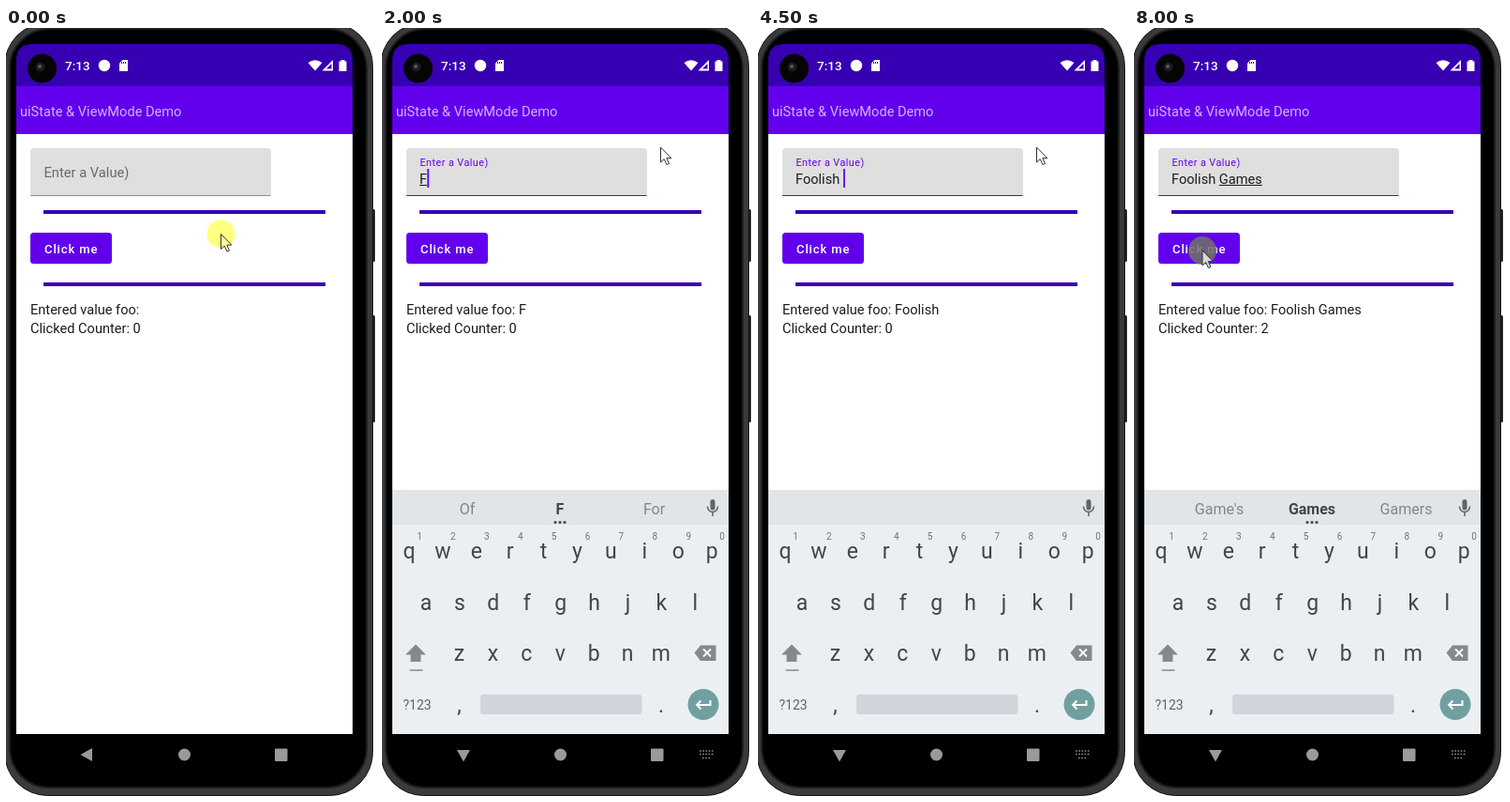
These frames come from a looping animation (395 by 818 pixels, 8500 ms). An HTML page:

```html
<!DOCTYPE html>
<html lang="en">
<head>
<meta charset="utf-8">
<title>uiState demo</title>
<style>
html, body { margin: 0; width: 100%; height: 100%; overflow: hidden; background: #fff; }
svg { display: block; width: 395px; height: 818px; font-family: Roboto, sans-serif; }
text { white-space: pre; }
.body { font-size: 14.6px; fill: #1c1c1c; }
.key { font-size: 23px; fill: #41464a; text-anchor: middle; }
.digit { font-size: 10px; fill: #6d7276; text-anchor: middle; }
.hint { font-size: 16px; fill: #80868b; text-anchor: middle; }
.mid { font-weight: 700; fill: #41464a; }
</style>
</head>
<body>
<svg viewBox="0 0 395 818" xmlns="http://www.w3.org/2000/svg">
  <rect width="395" height="818" fill="#fff"/>

  <!-- phone body -->
  <g fill="#222">
    <rect x="389" y="193" width="5" height="56" rx="1.5"/>
    <rect x="389" y="306" width="5" height="114" rx="1.5"/>
  </g>
  <rect x="-1.5" y="-5.500" width="393" height="823" rx="46" fill="#3a3a3a" stroke="#151515"/>
  <rect x="4" y="1" width="381" height="808" rx="42" fill="#000" stroke="#1c1c1c" stroke-width="2"/>
  <path d="M11 62V35Q11 17 29 17H352Q370 17 370 35V62Z" fill="#3700b3"/>
  <rect x="11" y="62" width="359" height="51" fill="#6200ee"/>
  <rect x="11" y="113" width="359" height="639" fill="#fff"/>

  <!-- status bar -->
  <circle cx="38.5" cy="43" r="15.5" fill="#050505"/>
  <circle cx="36.5" cy="41.5" r="5" fill="#1c1c20"/>
  <circle cx="36" cy="41" r="2" fill="#55555c"/>
  <g fill="#fff">
    <text x="63" y="45" font-size="13.5" font-weight="500">7:13</text>
    <circle cx="105" cy="40" r="6.2"/>
    <path d="M124.500 34H130V46H121V37.500Z"/>
    <path d="M322.500 37Q330 31.500 337.500 37L330 45.500Z"/>
    <path d="M349 34V45.500H337.500Z"/>
    <path d="M357.500 35.500V34H361.500V35.500H363.500V46H355.500V35.500Z"/>
  </g>
  <path d="M123.500 36V38M125.500 36V38M127.500 36V38" stroke="#3700b3"/>
  <path d="M347.500 38V43.500H342Z" fill="#3700b3"/>
  <text x="15" y="94" font-size="14.6" fill="#d0b3fa">uiState &amp; ViewMode Demo</text>

  <!-- form -->
  <path d="M26 179V132Q26 128 30 128H279Q283 128 283 132V179Z" fill="#dfdfdf"/>
  <rect id="line" x="26" y="178" width="256.500" height="1"/>
  <text id="label" x="40.500">Enter a Value)</text>
  <text id="value" class="body" x="40" y="165.500"></text>
  <rect id="under" y="167" height="1" fill="#1c1c1c"/>
  <rect id="caret" y="150" width="1.800" height="20" fill="#6200ee"/>
  <path d="M40 196H341M40 273H341" stroke="#3700b3" stroke-width="4"/>
  <rect x="26" y="219" width="87" height="33" rx="3.500" fill="#000" opacity=".14"/>
  <rect x="26" y="218" width="87" height="33" rx="3.500" fill="#6200ee"/>
  <text x="41" y="240" font-size="13" font-weight="500" letter-spacing=".9" fill="#fff">Click me</text>
  <text id="entered" class="body" x="26" y="305"></text>
  <text id="count" class="body" x="26" y="325"></text>

  <!-- keyboard -->
  <g id="board">
    <rect x="11" y="492" width="359" height="260" fill="#eceff1"/>
    <rect x="11" y="492" width="359" height="37" fill="#e1e5e8"/>
    <g id="hints">
      <text class="hint" x="91" y="518"></text>
      <text class="hint mid" x="190" y="518"></text>
      <text class="hint" x="290.500" y="518"></text>
      <path d="M185 526.500h.01M190 526.500h.01M195 526.500h.01" stroke="#41464a" stroke-width="3.200" stroke-linecap="round"/>
    </g>
    <rect x="350.500" y="502" width="5" height="11.500" rx="2.500" fill="#5f6468"/>
    <path d="M347.500 509.500a5.500 6 0 0 0 11 0M353 515.500V520" fill="none" stroke="#5f6468" stroke-width="1.600"/>
    <g id="keys"></g>
    <g id="mods">
      <path d="M36 656.500L47 667.500H41.500V675H30.500V667.500H25Z"/>
      <path d="M29.500 684H43.500" stroke="currentColor" stroke-width="1.500"/>
      <path d="M333.500 665.500L340 657.500H356.500V674H340Z"/>
    </g>
    <path d="M343 661.500l8 8m0 -8l-8 8" stroke="#fff" stroke-width="1.800"/>
    <text x="22.500" y="726" font-size="14" fill="#5f6468">?123</text>
    <rect x="105" y="710" width="172.500" height="21" rx="3" fill="#d2d4db"/>
    <circle cx="343" cy="720.500" r="16.500" fill="#6fa09f"/>
    <path d="M350.500 716V721H336M340.500 716.500L336 721L340.500 725.500" fill="none" stroke="#fff" stroke-width="1.900"/>
    <path d="M339 770H354M339 773.500H354M342 777.500H351" stroke="#8a8a8a" stroke-width="1.700" stroke-dasharray="1.700 1.500"/>
  </g>

  <!-- navigation -->
  <g fill="#9a9a9a">
    <path id="back" d="M79.500 774L92 767V781Z"/>
    <circle cx="190.500" cy="774" r="6.500"/>
    <rect x="287" y="767.500" width="13.500" height="13.500" rx="1"/>
  </g>

  <!-- pointer -->
  <g id="mouse">
    <circle id="halo" r="15"/>
    <path id="arrow" d="M0 0V16L3.700 12.600L6.500 18.600L9 17.500L6.300 11.600H11.300Z" stroke="#333" stroke-width="1"/>
  </g>
</svg>
<script>
const $ = id => document.getElementById(id);
const NS = 'http://www.w3.org/2000/svg';
const STEP = 500, LOOP = 8500;

function addKey(cls, x, y, char) {
  const t = document.createElementNS(NS, 'text');
  t.setAttribute('class', cls);
  t.setAttribute('x', x);
  t.setAttribute('y', y);
  t.textContent = char;
  $('keys').append(t);
}
const addRow = (cls, chars, x, y) =>
  [...chars].forEach((c, i) => addKey(cls, x + i * 35.9, y, c));
addRow('key', 'qwertyuiop', 29, 564.5);
addRow('digit', '1234567890', 40, 544.5);
addRow('key', 'asdfghjkl', 47, 619.5);
addRow('key', 'zxcvbnm', 82.5, 674);
addKey('key', 82.5, 729, ',');
addKey('key', 298, 729, '.');

// Each entry holds from its time until a later one replaces the same property.
const script = [
  [0, { text: '', hints: '', focus: false, caret: false, turn: 0, count: 0, x: 229.5, y: 219.5, halo: '#ffff80' }],
  [500, { x: 190, y: 157 }],
  [1000, { focus: true, caret: true, turn: -27, x: 297.5, y: 127, halo: '' }],
  [1500, { turn: -90 }],
  [2000, { text: 'F', hints: 'Of,F,For' }],
  [2500, { text: 'Foo', hints: 'Food,Foo,Foot' }],
  [3000, { text: 'Fooli', hints: 'Foolish,Fooli,Fooling' }],
  [3500, { text: 'Foolish', hints: 'Foolishly,Foolish,Foolishness' }],
  [4000, { text: 'Foolish ' }],
  [4500, { hints: '' }],
  [5500, { text: 'Foolish G' }],
  [6000, { text: 'Foolish Game', hints: "Game's,Game,Games" }],
  [6500, { text: 'Foolish Games', hints: "Game's,Games,Gamers", x: 198, y: 220 }],
  [7000, { x: 73, y: 237, halo: '#70706a' }],
  [7500, { count: 1 }],
  [8000, { count: 2, caret: false }]
];

function set(id, attrs) {
  for (const k in attrs) $(id).setAttribute(k, attrs[k]);
}
const show = (id, on) => set(id, { visibility: on ? 'visible' : 'hidden' });

function draw(time) {
  const s = {};
  for (const [at, change] of script) if (at <= time) Object.assign(s, change);
  const pressed = time >= 7000;

  set('line', { fill: s.focus ? '#6200ee' : '#8d8d8d' });
  set('label', s.focus
    ? { y: 146.5, 'font-size': 10.8, 'letter-spacing': .45, fill: '#6200ee' }
    : { y: 158.5, 'font-size': 14.7, 'letter-spacing': 0, fill: '#686868' });

  $('value').textContent = s.text;
  $('entered').textContent = 'Entered value foo: ' + s.text;
  $('count').textContent = 'Clicked Counter: ' + s.count;

  const end = s.text.length;
  const start = s.text.lastIndexOf(' ') + 1;
  const width = n => n ? $('value').getSubStringLength(0, n) : 0;
  const left = width(start), right = width(end);
  set('under', { x: 40 + left, width: Math.max(0, right - left) });
  set('caret', { x: 40.3 + right });
  show('under', end > start);
  show('caret', s.caret);

  show('board', s.focus);
  const words = s.hints.split(',');
  $('hints').setAttribute('display', s.hints ? 'inline' : 'none');
  $('hints').querySelectorAll('text').forEach((t, i) => t.textContent = words[i] || '');
  const tone = s.text ? '#85898d' : '#6fa09f';
  set('mods', { fill: tone, color: tone });

  set('back', { transform: `rotate(${s.turn} 87 774)` });
  set('mouse', { transform: `translate(${s.x} ${s.y})` });
  set('halo', { fill: s.halo || 'none', opacity: pressed ? .88 : 1 });
  set('arrow', { fill: pressed ? '#d8d8d8' : s.halo ? '#ffffa8' : '#fff' });
}

let last = -1;
function tick() {
  const time = Math.floor(performance.now() % LOOP / STEP) * STEP;
  if (time !== last) draw(last = time);
  requestAnimationFrame(tick);
}
tick();
</script>
</body>
</html>
```
